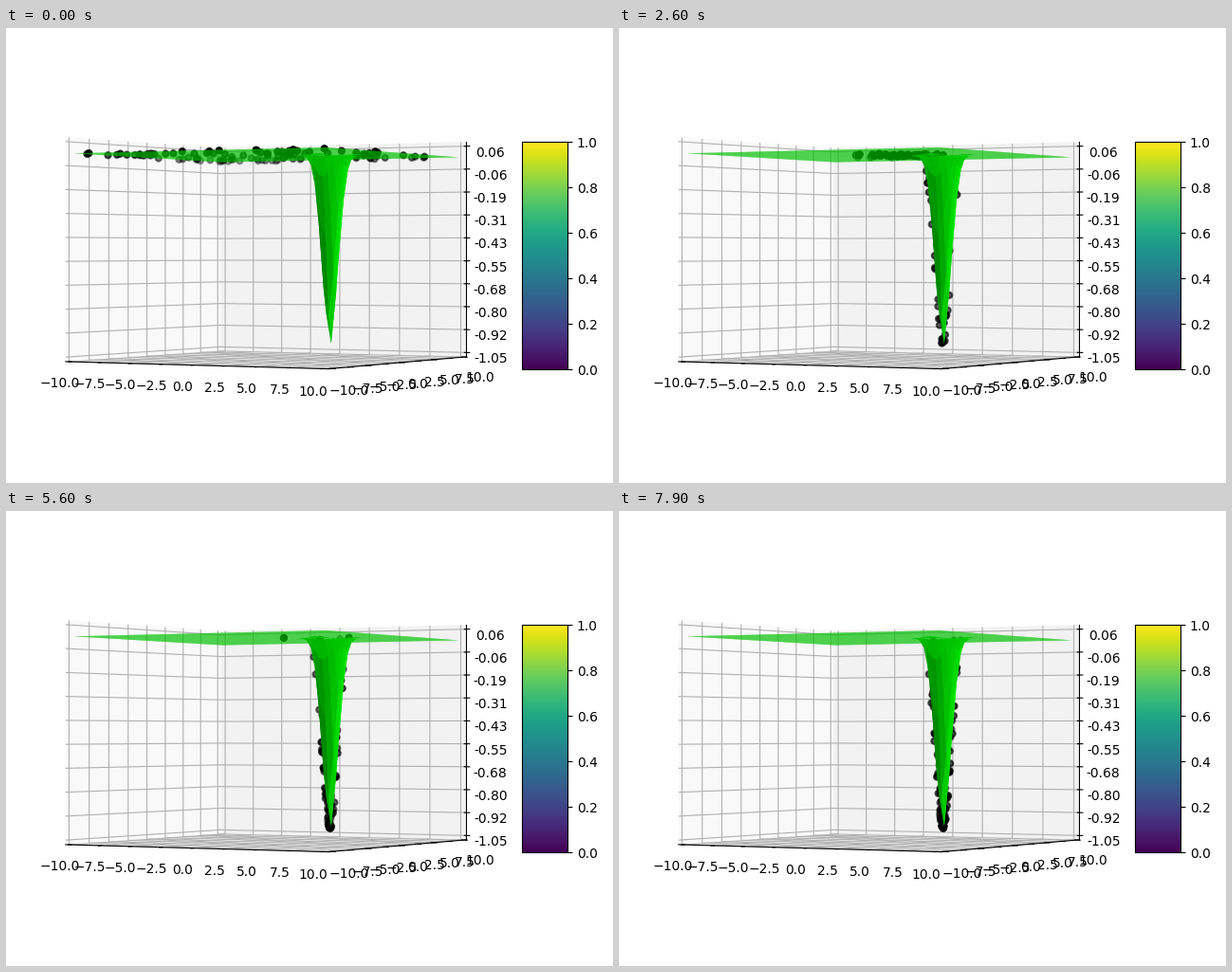
Write a matplotlib script that moves like this. It is 640x480 px and loops after 8 s.

```python
import matplotlib.pyplot as plt
import numpy as np
from matplotlib.animation import FuncAnimation
from matplotlib.collections import LineCollection, PolyCollection
from matplotlib.patches import Polygon

W, H, DPI = 640, 480, 100
FRAMES, INTERVAL = 80, 100
N = 100

# Camera: elevation 0, azimuth -60, ten units from the box centre
AZIM = np.radians(-60)
DIST, SCALE = 10, 480 / 0.185
CX, CY = 278.49, 233.51
XY_UNIT = 1.1429 / 20
Z_LO, Z_HI = -1.046, 0.06
Z_MID, Z_UNIT = (Z_LO + Z_HI) / 2, 0.8572 / (Z_HI - Z_LO)

# Padded bounds of the box and the label and tick offsets
PAD = 25 / 24
B = 10 * PAD
ZB = Z_MID - (Z_HI - Z_LO) / 2 * PAD
ZT = Z_MID + (Z_HI - Z_LO) / 2 * PAD
LABEL = 0.0665
OUT, IN = 20 / 60, 20 / 120

# Default pane greys at half opacity over white
LEFT_PANE, BACK_PANE, FLOOR = "0.975", "0.95", "0.9625"
GRID = "#b0b0b0"


def depth(x, y):
    return DIST - (x * np.cos(AZIM) + y * np.sin(AZIM)) * XY_UNIT


def project(x, y, z):
    u = (-x * np.sin(AZIM) + y * np.cos(AZIM)) * XY_UNIT
    k = SCALE / depth(x, y)
    return np.stack(np.broadcast_arrays(CX + u * k, CY - (z - Z_MID) * Z_UNIT * k), -1)


def path(*points):
    return [project(*p) for p in points]


def easom(x, y):
    r2 = (x - np.pi) ** 2 + (y - np.pi) ** 2
    return -np.cos(x) * np.cos(y) * np.exp(-r2)


fig = plt.figure(figsize=(W / DPI, H / DPI), dpi=DPI, facecolor="white")
ax = fig.add_axes([0, 0, 1, 1])
ax.axis("off")


def pane(color, *points):
    ax.add_patch(Polygon(path(*points), closed=True, fc=color, ec="none", zorder=0))


def lines(segs, color, z):
    ax.add_collection(LineCollection(segs, colors=color, linewidths=0.8, zorder=z))


def label(pos, text, **kw):
    kw = {"ha": "center", "va": "top", **kw}
    ax.text(*pos, text, fontsize=10, family="DejaVu Sans", zorder=5, **kw)


def draw_box():
    pane(LEFT_PANE, (-B, -B, ZB), (-B, B, ZB), (-B, B, ZT), (-B, -B, ZT))
    pane(BACK_PANE, (-B, B, ZB), (B, B, ZB), (B, B, ZT), (-B, B, ZT))
    pane(FLOOR, (-B, -B, ZB), (B, -B, ZB), (B, B, ZB), (-B, B, ZB))

    grid, ticks = [], []
    off = B + 20 * LABEL
    z_off = ZB - (Z_HI - Z_LO) * LABEL
    for t in np.linspace(-10, 10, 9):
        grid.append(path((t, -B, ZB), (t, B, ZB), (t, B, ZT)))
        grid.append(path((B, t, ZB), (-B, t, ZB), (-B, t, ZT)))
        ticks.append(path((t, -B - OUT, ZB), (t, -B + IN, ZB)))
        ticks.append(path((B + OUT, t, ZB), (B - IN, t, ZB)))
        text = f"{t:.1f}".replace("-", "\u2212")
        label(project(t, -off, z_off), text)
        label(project(off, t, z_off), text)
    for t in np.linspace(Z_LO, Z_HI, 10):
        grid.append(path((-B, -B, t), (-B, B, t), (B, B, t)))
        ticks.append(path((B + OUT, B, t), (B - IN, B, t)))
        label(project(off, off, t), "-1.05" if t == Z_LO else f"{t:.2f}")
    lines(grid, GRID, 1)
    lines(ticks, "black", 1.5)
    corners = path((-B, -B, ZB), (B, -B, ZB), (B, B, ZB), (B, B, ZT))
    for p, q in zip(corners, corners[1:]):
        ax.plot([p[0], q[0]], [p[1], q[1]], color="black", lw=0.8, zorder=1.5)


def draw_surface():
    g = np.linspace(-10, 10, 51)
    x, y = np.meshgrid(g, g)
    v = np.stack([x, y, easom(x, y)], -1)
    quads = np.stack([v[:-1, :-1], v[:-1, 1:], v[1:, 1:], v[1:, :-1]], 2).reshape(-1, 4, 3)

    normal = np.cross(quads[:, 2] - quads[:, 0], quads[:, 3] - quads[:, 1])
    normal /= np.linalg.norm(normal, axis=1, keepdims=True)
    az, alt = np.radians(90 - 225), np.radians(19.4712)
    light = [np.cos(az) * np.cos(alt), np.sin(az) * np.cos(alt), np.sin(alt)]
    colors = np.zeros((len(quads), 3))
    colors[:, 1] = 0.3 + 0.35 * (normal @ light + 1)

    # Antialiased slivers leave the edge-on plane partly see-through
    mid = quads.mean(1)
    order = np.argsort(-depth(mid[:, 0], mid[:, 1]))
    polys = project(quads[..., 0], quads[..., 1], quads[..., 2])
    ax.add_collection(PolyCollection(polys[order], facecolors=colors[order], edgecolors="none",
                                     linewidths=0, antialiaseds=True, zorder=3))


def draw_colorbar():
    ax.imshow(np.linspace(1, 0, 256)[:, None], cmap="viridis", extent=(544, 592, 360, 120),
              aspect="auto", interpolation="nearest", zorder=2)
    frame = [(544, 120), (592, 120), (592, 360), (544, 360), (544, 120)]
    ticks = [[(592, 360 - 48 * k), (596.9, 360 - 48 * k)] for k in range(6)]
    lines([frame] + ticks, "black", 4)
    for k in range(6):
        label((601.7, 360 - 48 * k), f"{k / 5:.1f}", ha="left", va="center_baseline")


draw_box()
draw_surface()
draw_colorbar()
ax.set_xlim(0, W)
ax.set_ylim(H, 0)

# Swarm: particles contract around the plateau, fall into the well one by one and wander there
rng = np.random.default_rng(12)
start = rng.uniform(-10, 10, (N, 2))
rest = rng.normal(0.8, 1.3, (N, 2))
tau = rng.uniform(8, 18, (N, 1))
capture = rng.normal(25, 12, (N, 1)).clip(5, 54)
reach = rng.normal(0, 0.65, (N, 2))
speed = rng.uniform(0.25, 0.7, (N, 2))
phase = rng.uniform(0, 2 * np.pi, (N, 2))
dots = ax.scatter(np.zeros(N), np.zeros(N), s=20, c="black", linewidths=1.5, zorder=2.5)


def update(n):
    roam = rest + (start - rest) * np.exp(-n / tau)
    well = np.pi + reach * np.cos(speed * n + phase)
    s = np.clip((n - capture) / 6, 0, 1)
    s = s * s * (3 - 2 * s)
    x, y = (roam + (well - roam) * s).T
    d = depth(x, y)
    order = np.argsort(-d)
    rgba = np.zeros((N, 4))
    rgba[:, 3] = 1 - 0.7 * (d - d.min()) / np.ptp(d)
    dots.set_offsets(project(x, y, easom(x, y))[order])
    dots.set_color(rgba[order])
    return (dots,)


anim = FuncAnimation(fig, update, frames=FRAMES, interval=INTERVAL, repeat=True,
                     repeat_delay=0, blit=False)
plt.show()
```
